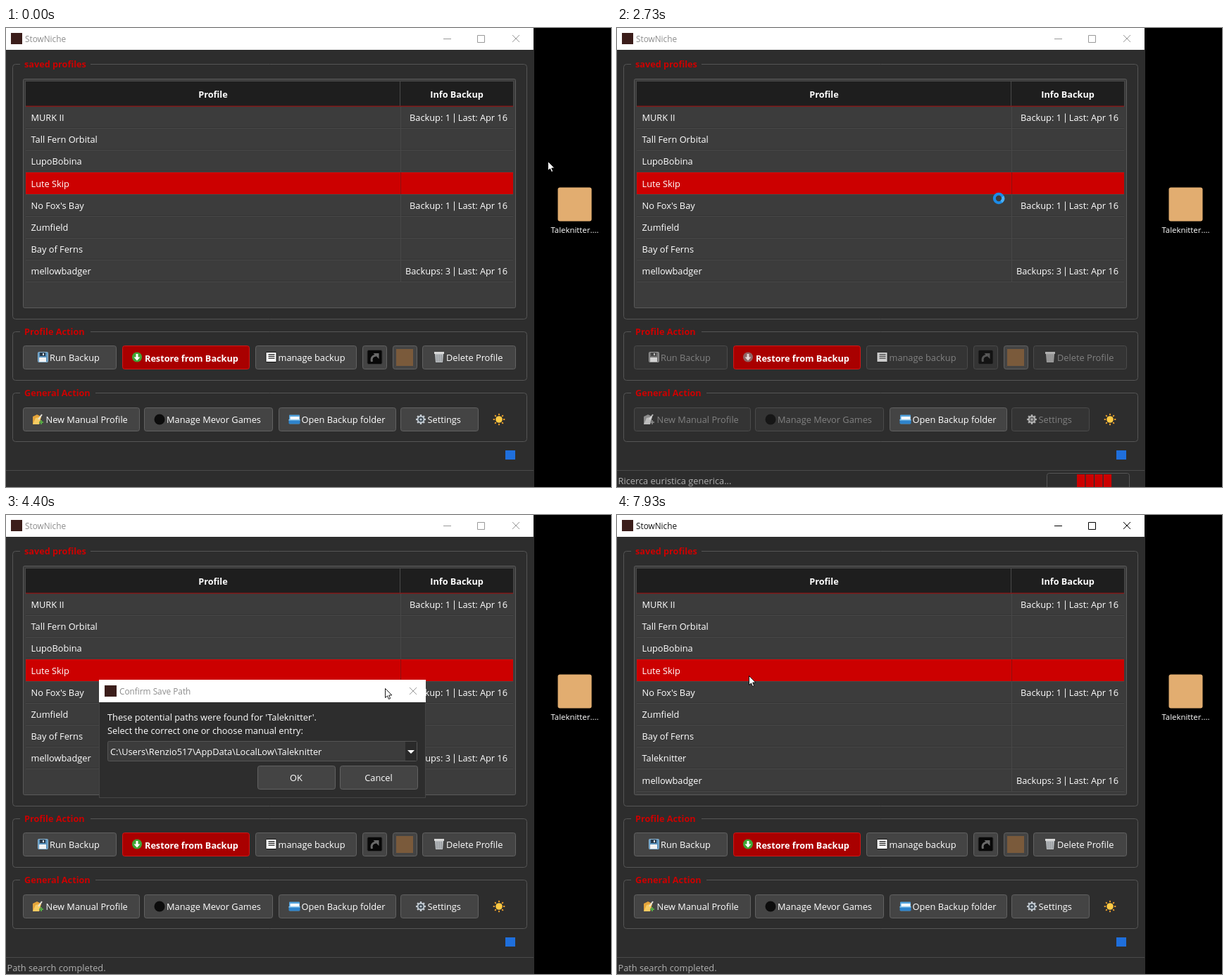
An HTML page with a canvas for the animation above (8 s loop, 859x652 px).

```html
<!DOCTYPE html>
<html lang="en">
<head>
<meta charset="utf-8">
<title>Profile manager</title>
<style>
  html, body { margin: 0; width: 859px; height: 652px; overflow: hidden; background: #000; }
  canvas { display: block; }
</style>
</head>
<body>
<canvas id="stage" width="859" height="652"></canvas>
<script>
const LOOP = 8000, TICK = 1000 / 15;
const BODY = '#2d2d2d', PANEL = '#3c3c3c', RED = '#cc0000', LINE = '#555';
const FAMILY = '"Open Sans", "Noto Sans", sans-serif';
const UI = `12.8px ${FAMILY}`, BOLD = `bold 12.7px ${FAMILY}`;
const CAPTION = `11.8px ${FAMILY}`, SMALL = `11.4px ${FAMILY}`;
const DIALOG = { x: 132, y: 234, w: 464, h: 168 };

const stage = document.getElementById('stage').getContext('2d');
const layer = document.createElement('canvas');
layer.width = DIALOG.w;
layer.height = DIALOG.h;
let g = stage;

// Pointer stops: tick, x, y, and 1 for a decelerating move
const STOPS = [
  [0, 769, 189], [6, 806, 204, 1], [9, 806, 204], [18, 814, 256], [22, 814, 256],
  [23, 798, 258], [32, 542, 242, 1], [58, 542, 242], [59, 543, 243], [65, 543, 243],
  [66, 538, 246], [78, 432, 375, 1], [96, 432, 375], [109, 197, 271],
  [114, 183, 221, 1], [117, 183, 221], [119, 187, 228]
];

const ROWS = [
  ['MURK II', 1], ['Tall Fern Orbital', 0], ['LupoBobina', 0], ['Lute Skip', 0],
  ["No Fox's Bay", 1], ['Zumfield', 0], ['Bay of Ferns', 0],
  ['Taleknitter', 0], ['mellowbadger', 3]
];

const smooth = u => u * u * (3 - 2 * u);

function pointerAt(tick) {
  const i = STOPS.findIndex(s => s[0] >= tick);
  if (i < 1) return STOPS[i ? STOPS.length - 1 : 0].slice(1, 3);
  const a = STOPS[i - 1], b = STOPS[i];
  const u = (tick - a[0]) / (b[0] - a[0]);
  const e = b[3] ? 1 - (1 - u) ** 2 : smooth(u);
  return [a[1] + (b[1] - a[1]) * e, a[2] + (b[2] - a[2]) * e];
}

function fill(color, x, y, w, h) {
  g.fillStyle = color;
  g.fillRect(x, y, w, h);
}

function box(x, y, w, h, r, bg, border) {
  g.beginPath();
  g.roundRect(x + .5, y + .5, w - 1, h - 1, r);
  if (bg) { g.fillStyle = bg; g.fill(); }
  if (border) { g.strokeStyle = border; g.lineWidth = 1; g.stroke(); }
}

function text(str, x, y, font = UI, color = '#fff', align = 'left') {
  g.font = font;
  g.fillStyle = color;
  g.textAlign = align;
  g.fillText(str, x, y);
}

function poly(points, color) {
  g.beginPath();
  points.forEach(([x, y]) => g.lineTo(x, y));
  g.closePath();
  g.fillStyle = color;
  g.fill();
}

function path(points, color, width = 1) {
  g.beginPath();
  points.forEach(([x, y]) => g.lineTo(x, y));
  g.strokeStyle = color;
  g.lineWidth = width;
  g.stroke();
}

function disc(x, y, r, color) {
  g.beginPath();
  g.arc(x, y, r, 0, 7);
  g.fillStyle = color;
  g.fill();
}

function closeMark(x, y, color) {
  path([[x - 5, y - 5], [x + 5, y + 5]], color);
  path([[x + 5, y - 5], [x - 5, y + 5]], color);
}

function at(x, y, draw) {
  g.save();
  g.translate(x, y);
  draw();
  g.restore();
}

// Icons are drawn around their own centre
const icons = {
  disk() {
    box(-7, -8, 15, 15, 1, '#5b93bd', '#8fb8d4');
    fill('#26384a', -4, -7, 8, 5);
    fill('#d5dde4', 0, -6, 2, 3);
    fill('#f2f2f2', -5, 0, 10, 6);
  },
  restore() {
    disc(0, -.5, 7, '#3fa535');
    fill('#fff', -1.5, -5, 3, 5);
    poly([[-4.5, -.5], [4.5, -.5], [0, 4.5]], '#fff');
  },
  list() {
    box(-8, -8, 16, 15, 1, '#fff', '#111');
    for (let y = -5; y <= 3; y += 2.7) fill('#222', -4, y, 9, 1.3);
  },
  link() {
    box(-11, -11, 22, 21, 2, '#080808', '#333');
    g.beginPath();
    g.moveTo(-4, 6);
    g.quadraticCurveTo(-6, -2, 2, -3);
    g.strokeStyle = '#6a6a6a';
    g.lineWidth = 3;
    g.stroke();
    poly([[-2, -6], [6, -6], [6, 2]], '#6a6a6a');
  },
  block() { fill('#7a5a3b', -12, -12, 24, 24); },
  bin() {
    fill('#d8d8d8', -7, -8, 14, 3);
    poly([[-6, -5], [6, -5], [5, 7], [-5, 7]], '#b9bdc0');
    for (const x of [-3, 0, 3]) fill('#83888c', x - .5, -4, 1, 10);
  },
  create() {
    poly([[-7, -4], [-1, -7], [5, -4], [2, 7], [-7, 7]], '#e3a33a');
    poly([[-7, 7], [-3, -2], [5, -4], [2, 7]], '#f6cb62');
    path([[1, 0], [6, -7]], '#e4e0d6', 2);
    fill('#56a944', 2, 3, 6, 2);
    fill('#56a944', 4, 1, 2, 6);
  },
  dot() { disc(0, 0, 7.5, '#0c0c0c'); },
  folder() {
    box(-8, -7, 16, 14, 1, '#54a5e0');
    fill('#f4f8fb', -6, -4, 13, 5);
    fill('#2d83cc', -8, 0, 16, 6);
    fill('#8fc9ef', -8, 0, 16, 1.5);
  },
  gear() {
    for (let i = 0; i < 8; i++) {
      const a = i * Math.PI / 4;
      path([[0, 0], [7 * Math.cos(a), 7 * Math.sin(a)]], '#c4ccd3', 2.4);
    }
    disc(0, 0, 5.4, '#c4ccd3');
    disc(0, 0, 3.6, '#3d4953');
    disc(0, 0, 1.6, '#c4ccd3');
  },
  sun() {
    for (let i = 0; i < 8; i++) {
      const a = i * Math.PI / 4, c = Math.cos(a), s = Math.sin(a);
      path([[6 * c, 6 * s], [8.3 * c, 8.3 * s]], '#f3a32c', 1.8);
    }
    disc(0, 0, 4.8, '#ffcb45');
  }
};

function icon(name, x, y, dim) {
  at(x, y, () => {
    if (dim) g.filter = 'grayscale(1) opacity(.75)';
    icons[name]();
  });
}

function button(x, y, w, label, labelX, name, iconX, dim) {
  box(x, y, w, 34, 3, dim ? '#343434' : '#444', dim ? '#4b4b4b' : '#626262');
  if (label) text(label, labelX, y + 21.5, UI, dim ? '#808080' : '#fff');
  icon(name, iconX, y + 17, dim);
}

function group(y, h, title, gapEnd) {
  box(9, y, 731, h, 4, null, LINE);
  fill(BODY, 20, y - 2, gapEnd - 20, 5);
  text(title, 26, y + 4.5, BOLD, RED);
}

function drawTitle(active) {
  const ink = active ? '#000' : '#999';
  fill('#fff', 0, 0, 749, 31);
  fill('#3b1d1a', 7, 7, 16, 16);
  text('StowNiche', 27, 19.5, CAPTION, active ? '#111' : '#8c8c8c');
  fill(ink, 621, 15, 11, 1);
  box(669, 10, 11, 11, 0, null, ink);
  closeMark(724, 15, ink);
}

function drawTable(extended) {
  box(24, 72, 700, 326, 2, PANEL, '#5a5a5a');
  fill('#1e1e1e', 28, 76, 692, 35);
  box(27, 75, 694, 37, 0, null, '#484848');
  fill('#4a4a4a', 559, 76, 1, 35);
  fill('#8c1515', 28, 110.5, 692, 1.3);
  text('Profile', 294, 99, BOLD, '#fff', 'center');
  text('Info Backup', 640, 99, BOLD, '#fff', 'center');

  const rows = extended ? ROWS : ROWS.filter((r, i) => i !== 7);
  rows.forEach(([name, count], i) => {
    const top = 111.5 + 31.2 * i, base = Math.round(top + 15.5) + 4.5;
    const edge = Math.round(top + 30.5);
    fill('#484848', 28, edge, 692, 1);
    fill('#343434', 28, edge - 1, 692, 1);
    fill('#484848', 560, Math.round(top), 1, 31);
    if (i === 3) {
      fill(RED, 28, 205, 692, 31);
      fill('#8e1111', 560, 205, 1, 31);
    }
    text(name, 35.5, base);
    if (count) {
      text('Last: Apr 16', 712, base, UI, '#fff', 'right');
      fill('#eee', 636, base - 10, 1, 13);
      text(`Backup${count > 1 ? 's' : ''}: ${count}`, 631, base, UI, '#fff', 'right');
    }
  });
}

function drawActions(busy) {
  group(431, 70, 'Profile Action', 120);
  button(24, 451, 133, 'Run Backup', 62, 'disk', 52, busy);
  box(165, 451, 181, 34, 3, '#a90000', '#d01818');
  icon('restore', 186, 468, busy);
  text('Restore from Backup', 197, 473.5, BOLD);
  button(354, 451, 144, 'manage backup', 386.5, 'list', 376.5, busy);
  button(506, 451, 35, '', 0, 'link', 523.5, busy);
  button(549, 451, 35, '', 0, 'block', 566, false);
  button(591, 451, 133, 'Delete Profile', 625, 'bin', 615, busy);

  group(518, 70, 'General Action', 127);
  button(24, 539, 166, 'New Manual Profile', 56.5, 'create', 45, busy);
  button(196, 539, 183, 'Manage Mevor Games', 228, 'dot', 218, busy);
  button(387, 539, 167, 'Open Backup folder', 419.5, 'folder', 409.5, false);
  button(560, 539, 111, 'Settings', 598.5, 'gear', 589, busy);
  icon('sun', 700, 556, false);
  fill('#1f6fdc', 709, 600, 14, 13);
}

function drawStatus(tick, busy) {
  fill('#4a4a4a', 0, 628, 749, 1);
  if (tick < 38) return;
  text(busy ? 'Ricerca euristica generica...' : 'Path search completed.', 1.5, 648, UI, '#b0b0b0');
  if (!busy) return;
  box(610, 632, 118, 24, 3, BODY, LINE);
  let off = Math.max(0, Math.floor((tick * TICK - 2525) / 40)) * 8.2 % 114;
  for (let i = 0; i < 4; i++) {
    fill(RED, 612 + off, 634, Math.min(11.3, 114 - off), 18);
    off = off + 25 > 115 ? 0 : off + 12.6;
  }
}

function desktopIcon() {
  box(783, 226, 49, 49, 3, '#e2ad70');
  text('Taleknitter....', 807.5, 291, SMALL, '#fff', 'center');
}

function dialogButton(x, label, hover) {
  box(x, 356, 111, 34, 3, hover ? '#545454' : '#444', hover ? '#707070' : '#626262');
  text(label, x + 55, 378, UI, '#fff', 'center');
}

function paintDialog(active, hover) {
  const { x, y, w, h } = DIALOG;
  g = layer.getContext('2d');
  g.setTransform(1, 0, 0, 1, -x, -y);
  box(x, y, w, h, 0, BODY, '#454545');
  fill('#fff', x, y, w, 32);
  fill('#3b1d1a', 140, 242, 17, 16);
  text('Confirm Save Path', 161, 255, CAPTION, active ? '#111' : '#8c8c8c');
  closeMark(578, 250, active ? '#000' : '#999');
  text("These potential paths were found for 'Taleknitter'.", 144, 292);
  text('Select the correct one or choose manual entry:', 144, 310.5);
  box(144, 321, 440, 29, 2, PANEL, LINE);
  fill('#2a2a2a', 567, 322, 16, 27);
  poly([[570, 334], [580, 334], [575, 339]], '#fff');
  text('C:\\Users\\Renzio517\\AppData\\LocalLow\\Taleknitter', 148, 340.5);
  dialogButton(357, 'OK', hover);
  dialogButton(474, 'Cancel', false);
  g = stage;
}

function drawDialog(tick, px, py) {
  if (tick < 59 || tick > 88) return;
  const { x, y, w, h } = DIALOG;
  let alpha, scale;
  if (tick < 87) {
    const u = Math.min(1, (tick - 58) / 4.5);
    alpha = smooth(u);
    scale = 1 - .055 * (1 - u);
  } else {
    const u = (tick - 86) / 2.3;
    alpha = (1 - u) ** 1.5;
    scale = 1 - .064 * u;
  }
  paintDialog(tick >= 84, px > 357 && px < 468 && py > 356);
  const sw = w * scale, sh = h * scale;
  g.globalAlpha = alpha;
  g.drawImage(layer, x + (w - sw) / 2, y + (h - sh) / 2, sw, sh);
  g.globalAlpha = 1;
}

function drawPointer(x, y) {
  at(x + .5, y + .5, () => {
    const shape = [[0, 0], [0, 13], [3, 10.4], [5, 15], [7.2, 14], [5.2, 9.6], [9.3, 9.4], [0, 0]];
    poly(shape, '#fff');
    path(shape, '#000', .9);
  });
}

function drawRing(x, y, tick) {
  const arc = (from, to, color) => {
    g.beginPath();
    g.arc(x, y, 6.2, from, to);
    g.strokeStyle = color;
    g.lineWidth = 4;
    g.stroke();
  };
  const a = tick * .45;
  arc(0, 7, '#1b8be8');
  arc(a, a + 1.3, '#48b0fa');
}

function draw(tick) {
  const [px, py] = pointerAt(tick);
  const busy = tick >= 38 && tick < 59;
  const done = tick >= 87;

  fill('#000', 0, 0, 859, 652);
  fill(BODY, 0, 31, 750, 621);
  drawTitle(done);
  group(51, 363, 'saved profiles', 120);
  drawTable(done);
  drawActions(busy);
  drawStatus(tick, busy);

  if (tick >= 13 && tick < 23) box(769, 222, 77, 75, 0, '#222', '#3a3a3a');
  desktopIcon();
  if (tick >= 23 && tick < 38) {
    at(px - 814, py - 256, () => {
      g.globalAlpha = .6;
      desktopIcon();
    });
  }

  drawDialog(tick, px, py);
  if (busy) drawRing(px, py, tick);
  else drawPointer(px, py);
}

const start = performance.now();
function loop() {
  const t = (performance.now() - start) % LOOP;
  draw(Math.floor((t + 5) / TICK) % 120);
  requestAnimationFrame(loop);
}
loop();
</script>
</body>
</html>
```
